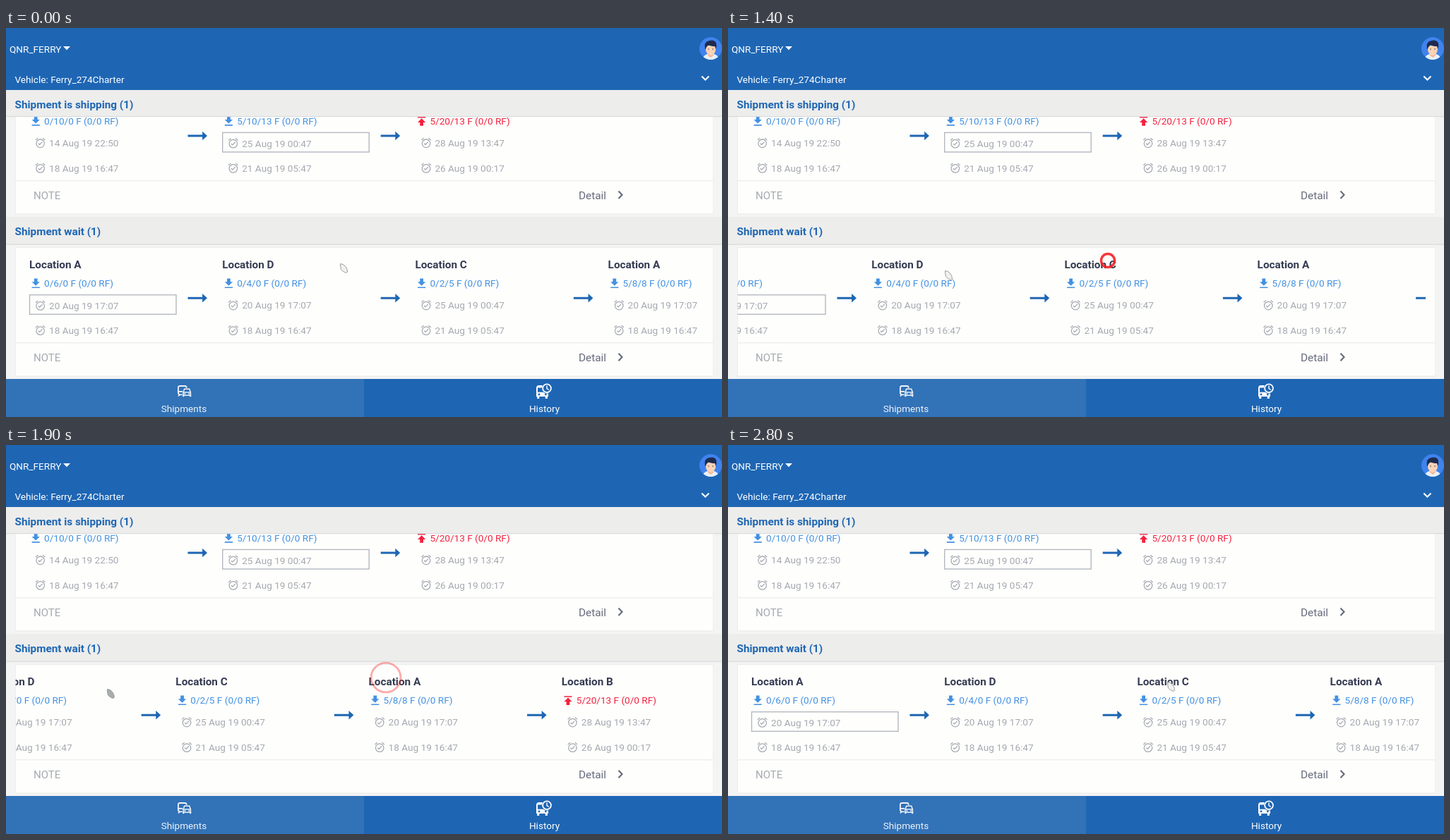
An HTML page with a canvas that plays this animation: 1014 px wide and 552 px high, repeating every 3200 ms.

```html
<!DOCTYPE html>
<html lang="en">
<head>
<meta charset="utf-8">
<title>Shipments</title>
<style>
html, body { margin: 0; width: 100%; height: 100%; overflow: hidden; background: #f4f4f4; }
canvas { display: block; width: 1014px; height: 552px; }
</style>
</head>
<body>
<canvas id="stage" width="1014" height="552"></canvas>
<script>
const ctx = document.getElementById('stage').getContext('2d');
const LOOP = 3200, PITCH = 273.2;
const BLUE = '#1e66b4', SKY = '#4391e3', RED = '#f4213f', INK = '#343b52',
      GREY = '#a5a9b1', SLATE = '#666b7c', PAPER = '#fefefc', STRIP = '#ededec';

// Smooth monotone curve through [time, value] points
function curve(pts) {
  const slope = i => (pts[i + 1][1] - pts[i][1]) / (pts[i + 1][0] - pts[i][0]);
  const last = pts.length - 1;
  const tan = pts.map((p, i) => {
    if (i === 0 || i === last) return 0;
    const a = slope(i - 1), b = slope(i);
    return a * b <= 0 ? 0 : 2 * a * b / (a + b);
  });
  return t => {
    if (t <= pts[0][0]) return pts[0][1];
    if (t >= pts[last][0]) return pts[last][1];
    let i = 0;
    while (t > pts[i + 1][0]) i++;
    const [t0, v0] = pts[i], [t1, v1] = pts[i + 1];
    const h = t1 - t0, u = (t - t0) / h, w = 1 - u;
    return v0 * (1 + 2 * u) * w * w + tan[i] * h * u * w * w
         + v1 * u * u * (3 - 2 * u) - tan[i + 1] * h * u * u * w;
  };
}

const pointerX = curve([[0, 473], [200, 493], [500, 525], [530, 533], [630, 534.5], [800, 535], [830, 537],
  [1000, 537], [1200, 460], [1400, 307], [1580, 215], [1760, 160], [1950, 140], [2200, 135],
  [2270, 135], [2400, 215], [2560, 407], [2700, 560], [2800, 622]]);
const pointerY = curve([[0, 334], [500, 333], [530, 331], [800, 330.5], [830, 330], [1000, 330],
  [1400, 344], [1760, 346], [2270, 346], [2560, 326], [2800, 336]]);
const scroll = curve([[1100, 0], [1260, 25], [1400, 103], [1580, 240], [1760, 314.5], [1950, 343],
  [2200, 349.5], [2270, 349.5], [2400, 320], [2560, 222], [2700, 75], [2800, 0]]);

function rect(x, y, w, h, color) {
  ctx.fillStyle = color;
  ctx.fillRect(x, y, w, h);
}
function text(str, x, y, color, size = 13.6, weight = 400, align = 'left') {
  ctx.font = `${weight} ${size}px Roboto, sans-serif`;
  ctx.textAlign = align;
  ctx.fillStyle = color;
  ctx.fillText(str, x, y);
}
function shape(d, x, y, scale, color, width) {
  ctx.save();
  ctx.translate(x, y);
  ctx.scale(scale, scale);
  const p = new Path2D(d);
  if (width) {
    ctx.strokeStyle = color;
    ctx.lineWidth = width;
    ctx.stroke(p);
  } else {
    ctx.fillStyle = color;
    ctx.fill(p, 'evenodd');
  }
  ctx.restore();
}
function disc(x, y, r, color) {
  ctx.fillStyle = color;
  ctx.beginPath();
  ctx.arc(x, y, r, 0, 7);
  ctx.fill();
}
function ring(x, y, r, color, width) {
  ctx.strokeStyle = color;
  ctx.lineWidth = width;
  ctx.beginPath();
  ctx.arc(x, y, r, 0, 7);
  ctx.stroke();
}

const LOAD = 'M19 9h-4V3H9v6H5l7 7 7-7zM5 18v2h14v-2H5z';
const UNLOAD = 'M5 4v2h14V4H5zm0 10h4v6h6v-6h4l-7-7-7 7z';
const ALARM = 'M4 13a8 8 0 1 0 16 0a8 8 0 1 0-16 0M2.7 6.5l4.6-3.9M21.3 6.5l-4.6-3.9M7.9 12.9l2.6 2.6 5.5-5.5';
const ARROW = 'M16 11.1H4v1.8h12v2.7L20 12l-4-3.6z';

function date(str, x, y) {
  shape(ALARM, x + 7, y - 8.9, 0.72, GREY, 1.75);
  text(str, x + 28, y + 4.8, GREY);
}

// One stop of a route; y is the top of the card
function stop(s, x, y, more) {
  const color = s.out ? RED : SKY;
  text('Location ' + s.place, x, y + 28.5, INK, 15.3, 700);
  shape(s.out ? UNLOAD : LOAD, x - 0.4, y + 41, 0.8, color);
  text(s.load, x + 21, y + 55.2, color);
  if (s.boxed) {
    ctx.strokeStyle = '#b4b8bf';
    ctx.lineWidth = 1.4;
    ctx.strokeRect(x + 0.5, y + 66.7, 207.5, 27.6);
  }
  date(s.due, x, y + 81.6 + (s.boxed ? 0.4 : 0));
  date(s.done, x, y + 117.2);
  if (more) shape(ARROW, x + 217.6, y + 50.6, 1.72, BLUE);
}
function card(stops, y, shift) {
  rect(13, y - 1, 988.5, 183.5, '#ececeb');
  rect(14, y, 987, 181.5, PAPER);
  ctx.save();
  ctx.beginPath();
  ctx.rect(13.5, y, 974.5, 134);
  ctx.clip();
  stops.forEach((s, i) => stop(s, 33 + i * PITCH - shift, y, i < stops.length - 1));
  ctx.restore();
  rect(14, Math.round(y + 134), 987, 1.4, '#eeeeee');
  text('NOTE', 39, y + 161.4, GREY, 15);
  text('Detail', 811, y + 161.4, SLATE, 15.3);
  shape('M0 0l5 5.2-5 5.2', 867.5, y + 149.8, 1, SLATE, 2.1);
}

const leg = (place, load, due, done, opt) => ({ place, load: load + ' F (0/0 RF)', due, done, ...opt });
const D18 = '18 Aug 19 16:47', D20 = '20 Aug 19 17:07', D21 = '21 Aug 19 05:47',
      D25 = '25 Aug 19 00:47', D26 = '26 Aug 19 00:17', D28 = '28 Aug 19 13:47';
const active = [
  leg('A', '0/10/0', '14 Aug 19 22:50', D18),
  leg('C', '5/10/13', D25, D21, { boxed: true }),
  leg('B', '5/20/13', D28, D26, { out: true })
];
const waiting = [
  leg('A', '0/6/0', D20, D18, { boxed: true }),
  leg('D', '0/4/0', D20, D18),
  leg('C', '0/2/5', D25, D21),
  leg('A', '5/8/8', D20, D18),
  leg('B', '5/20/13', D28, D26, { out: true })
];

function strip(title, y, h) {
  rect(0, y, 1014, h, STRIP);
  rect(0, y + h - 1, 1014, 1.2, '#d9dbde');
  text(title, 12.5, y + 26, BLUE, 15.3, 700);
}

function avatar() {
  ctx.save();
  ctx.beginPath();
  ctx.arc(998, 29, 16, 0, 7);
  ctx.clip();
  rect(982, 13, 32, 32, '#3f83ee');
  shape('M986 46q1-8 8-9h8q7 1 8 9z', 0, 0, 1, '#e9f0fa');
  shape('M994 35h8v4l-4 3-4-3z', 0, 0, 1, '#f3b995');
  shape('M991 25h14v6q-1 7-7 8-6-1-7-8z', 0, 0, 1, '#fbd3b4');
  shape('M990 30q-2-11 6-12 8-2 10 4 1 4-1 8l-1-4q-6 0-9-2-3 2-4 6z', 0, 0, 1, '#1f2b4d');
  disc(995, 30, 0.8, INK);
  disc(1001, 30, 0.8, INK);
  ctx.restore();
}

function header() {
  rect(0, 0, 1014, 88, BLUE);
  text('QNR_FERRY', 5, 35, '#fff');
  shape('M81 26h10l-5 5.2z', 0, 0, 1, '#fff');
  text('Vehicle: Ferry_274Charter', 12.5, 78.2, '#fff');
  shape('M985.3 68.6l5.1 5 5.1-5', 0, 0, 1, '#fff', 2.1);
  avatar();
}

function nav() {
  const left = '#3272b7', pale = '#eef3f9';
  rect(0, 498, 507, 54, left);
  rect(507, 498, 507, 54, BLUE);

  // train behind a car
  shape('M249.5 520.3h-3.2q-2.4-.3-2.4-2.8v-7.2q.2-2.3 2.6-2.3h6.8q2.4 0 2.5 2.8M244 515.8h6M246 520l-2 2.5',
    0, 0, 1, pale, 1.8);
  shape('M251 517l1.7-4.7h7l1.7 4.7v4.3h-10.4z', 0, 0, 1, pale, 1.5);
  rect(251, 516.3, 10.5, 1.4, pale);
  rect(250.3, 520.5, 2, 2.7, pale);
  rect(260.2, 520.5, 2, 2.7, pale);
  disc(253.4, 519.1, 1, pale);
  disc(259.2, 519.1, 1, pale);
  text('Shipments', 252, 545, pale, 13.55, 400, 'center');

  // bus with a clock
  shape('M751 511q0-4 4-4h10q3 0 3 4v12h-1.2v3h-3v-3h-8.6v3h-3v-3h-1.2zM753 510.5v6.2h13v-6.2z', 0, 0, 1, '#fff');
  disc(755, 520, 1.4, BLUE);
  disc(764.3, 520, 1.4, BLUE);
  disc(766, 511.3, 7.4, BLUE);
  ring(766, 511.3, 5.9, '#fff', 1.8);
  shape('M766 507.5v4.2l2.8 1.8', 0, 0, 1, '#fff', 1.4);
  text('History', 762.5, 545, '#fff', 13.55, 400, 'center');
}

function press(t) {
  if (t < 1000 || t >= 2300) return;
  ctx.save();
  ctx.globalAlpha = Math.max(0.05, Math.min(0.92, 1 - (t - 1300) / 950));
  ring(538, 330, 0.4 + (t - 1000) * 0.0228, '#f51e22', 3.8 - (t - 1000) / 1000);
  ctx.restore();
}

function pointer(x, y) {
  const g = ctx.createLinearGradient(x + 2, y + 10, x + 10, y + 4);
  g.addColorStop(0, '#f1f1ef');
  g.addColorStop(0.55, '#dcdedd');
  g.addColorStop(1, '#a9adad');
  const d = 'M.6.6Q4.5.4 7.6 4.2 11 8.5 10.4 12.2 9.8 14 7.3 13 3 11 1.6 8.8.6 6 .6.6z';
  shape(d, x, y, 1, g);
  shape(d, x, y, 1, '#8f9494', 0.9);
}

function draw(t) {
  rect(0, 0, 1014, 552, '#f4f4f4');
  card(active, 81.7, 0);
  strip('Shipment is shipping (1)', 88, 38);
  header();
  strip('Shipment wait (1)', 268, 39.5);
  card(waiting, 312, scroll(t));
  nav();
  press(t);
  pointer(pointerX(t), pointerY(t));
}

function step(t) {
  const k = Math.floor((Math.floor(t / 10) * 10 + 6.7) * 0.03);
  return Math.floor(k * 10 / 3) * 10;
}

const start = performance.now();
function tick() {
  draw(step((performance.now() - start) % LOOP));
  requestAnimationFrame(tick);
}
tick();
</script>
</body>
</html>
```
